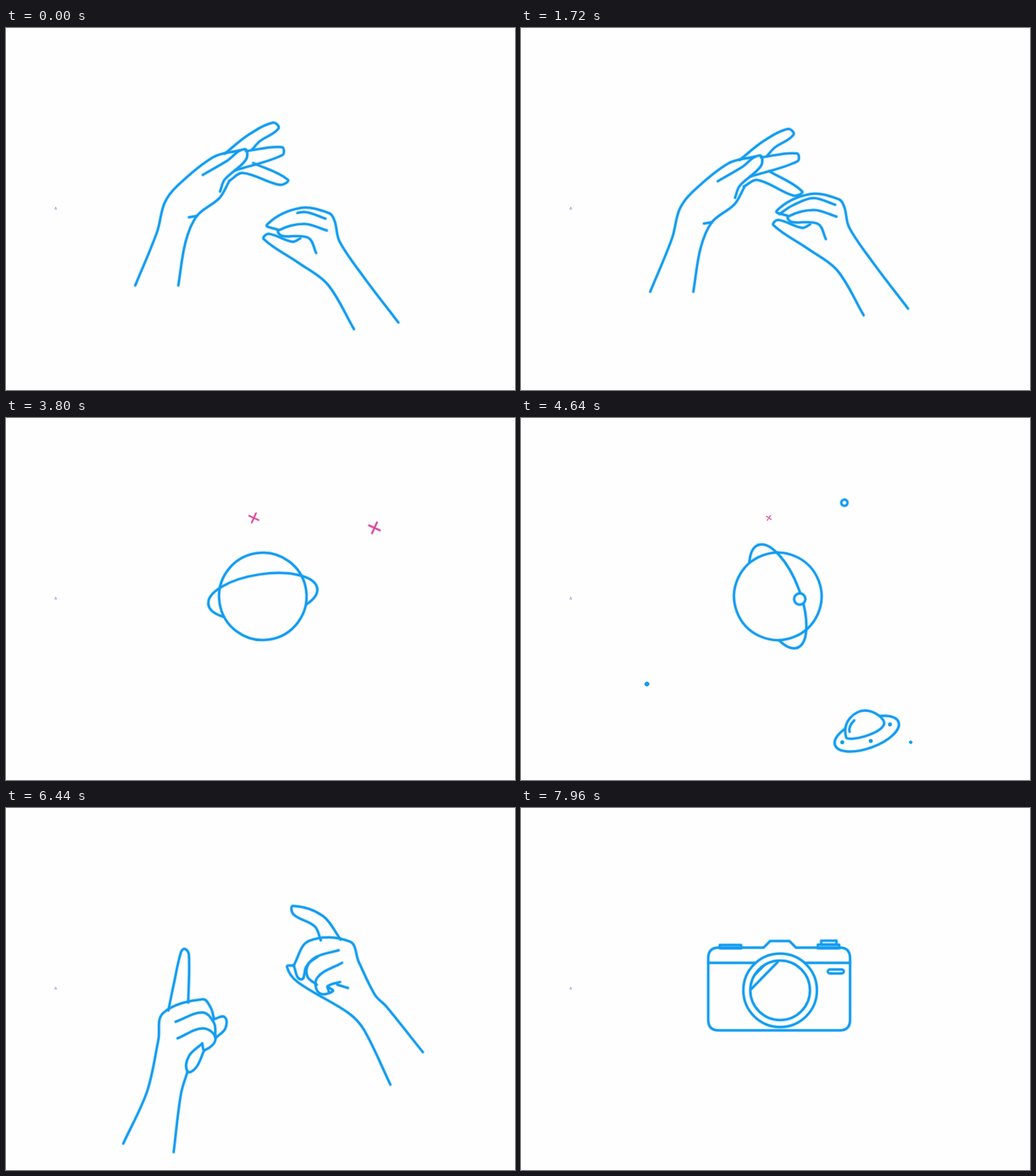
An HTML page with a canvas for the animation above (8000 ms loop, 768x547 px).

```html
<!DOCTYPE html>
<html>
<head>
<meta charset="utf-8">
<style>
html, body { margin: 0; width: 100%; height: 100%; overflow: hidden; background: #fefefe; }
canvas { display: block; }
</style>
</head>
<body>
<canvas width="768" height="547"></canvas>
<script>
const c = document.querySelector('canvas').getContext('2d');
const BLUE = '#129cf1', PINK = '#d84a9f', WHITE = '#fefefe';
const { PI, sin, cos, min, max, hypot } = Math, TAU = PI * 2;
c.lineCap = c.lineJoin = 'round';

const clamp = x => max(0, min(1, x));
const ease = x => (x = clamp(x), x * x * (3 - 2 * x));

function ink(path, color = BLUE, width = 3.5) {
  c.strokeStyle = color;
  c.globalAlpha = .16;
  c.lineWidth = width + 2.6;
  c.stroke(path);
  c.globalAlpha = 1;
  c.lineWidth = width;
  c.stroke(path);
}

function ellipse(x, y, rx, ry = rx, turn = 0, from = 0, to = TAU) {
  const path = new Path2D();
  path.ellipse(x, y, rx, ry, turn, from, to);
  return path;
}

function disc(x, y, r, color = BLUE) {
  c.fillStyle = color;
  c.fill(ellipse(x, y, r));
}

// Runs draw with the stage moved by x,y and turned and scaled about a pivot
function at(x, y, draw, scale = 1, turn = 0, px = 0, py = 0) {
  c.save();
  c.translate(x + px, y + py);
  c.rotate(turn);
  c.scale(scale, scale);
  c.translate(-px, -py);
  draw();
  c.restore();
}

// Smooth curve through key points; handles are a third of each segment
function curve(p) {
  const path = new Path2D(), last = p.length - 1;
  const dir = i => {
    const a = p[max(0, i - 1)], b = p[min(last, i + 1)];
    const d = hypot(b[0] - a[0], b[1] - a[1]);
    return [(b[0] - a[0]) / d, (b[1] - a[1]) / d];
  };
  path.moveTo(...p[0]);
  for (let i = 0; i < last; i++) {
    const a = p[i], b = p[i + 1], u = dir(i), v = dir(i + 1);
    const h = hypot(b[0] - a[0], b[1] - a[1]) / 3;
    path.bezierCurveTo(a[0] + u[0] * h, a[1] + u[1] * h, b[0] - v[0] * h, b[1] - v[1] * h, ...b);
  }
  return path;
}

const points = s => s.split(' ').map(p => p.split(',').map(Number));
const strokes = (...list) => list.map(s => curve(points(s)));
const drawAll = list => list.forEach(p => ink(p));

const openHand = strokes(
  '195,389 228,308 239,265 258,239 313,195 352,185',
  '297,222 333,201 360,183 362,199 330,229 323,247',
  '260,389 271,323 288,284 322,257 337,231',
  '276,286 288,284',
  '330,190 365,162 403,143 411,152 383,171 371,184',
  '362,186 416,180 417,192 346,215');
const [lowFinger] = strokes('337,231 357,219 413,237 425,229 373,204');

const pinchEdge = points('411,305 394,297 444,272 488,280 496,292 503,322 538,374 592,445');
const pinchThumb = points('444,318 432,323 396,311 389,319 440,354 485,387 525,455');
const pinchBody = new Path2D();
[...pinchEdge, ...[...pinchThumb].reverse()].forEach(p => pinchBody.lineTo(...p));
const pinchHand = [curve(pinchEdge), curve(pinchThumb),
  ...strokes('484,306 450,296 411,306 416,314 456,317 468,340')];
const [knuckle] = strokes('482,288 449,278 418,289 398,302');

const pointUp = strokes(
  '177,507 213,428 230,350 237,310 297,289 309,302 314,319',
  '245,306 253,267 264,218 270,213 276,222 275,294',
  '256,323 297,309 314,325 316,345',
  '259,348 297,333 316,348 300,366 296,356',
  '314,319 330,316 331,333 317,347',
  '296,356 276,375 274,398 287,392 299,366',
  '274,398 264,432 253,520');
const pointSide = strokes(
  '475,200 466,179 434,161 433,148 478,163 505,199',
  '434,238 457,201 519,202 532,232 557,283 573,299 629,369',
  '434,238 424,240 440,263 517,310 540,335 580,418',
  '434,238 445,259 453,240 468,225 502,215',
  '470,225 456,236 455,255 469,267',
  '507,234 470,256 472,279 493,277 485,270',
  '487,277 486,269 504,263',
  '500,267 516,272');

function pinchScene(t) {
  const bend = ease((t - 400) / 400);
  // The left hand swings down in a loop, rebounds and rests, every 1680 ms
  const u = max(0, t - 400) % 1680, swing = u / 880, rebound = clamp((u - 880) / 440);
  const x = swing < 1 ? -21 * sin(TAU * swing) : 0;
  const y = 9.5 * ease((t - 400) / 1320) + (swing < 1 ? 172 * sin(PI * swing) : -22 * sin(PI * rebound));
  at(x, y, () => {
    drawAll(openHand);
    at(0, 0, () => ink(lowFinger), 1, .1 * bend, 345, 222);
  });
  const lift = ease((t - 400) / 600);
  at(3 * lift - 11 * ease((t - 1200) / 500), -21 * lift, () => {
    c.fillStyle = WHITE;
    c.fill(pinchBody);
    drawAll(pinchHand);
    c.setLineDash([44 + 56 * bend, 200]);
    ink(knuckle);
  });
}

function ufo() {
  ink(ellipse(0, 0, 51, 22, -.35));
  const dome = new Path2D('M-31,6C-38,-18 -18,-35 -3,-35C12,-35 28,-22 26,-14C20,1 -25,12 -31,6Z');
  c.fillStyle = WHITE;
  c.fill(dome);
  ink(dome);
  ink(new Path2D('M-19,-20Q-28,-11 -26,-3'));
  [[-37, 13], [6, 11], [35, -14]].forEach(p => disc(...p, 3));
}

const cross = () => ink(new Path2D('M-9,0H9M0,-9V9'), PINK, 2.6);
const dot = () => disc(0, 0, 3.6);
const ring = () => ink(ellipse(0, 0, 4.7));

// Shape, place and the time at which each one is largest
const sparks = [
  [cross, 196, 289, 2960], [dot, 263, 193, 2960], [cross, 556, 166, 3560], [cross, 374, 151, 4150],
  [ring, 488, 128, 4600], [dot, 190, 402, 4600], [dot, 588, 490, 5050]
];

function planetScene(t) {
  for (const [shape, x, y, peak] of sparks) {
    const age = (t - peak) / 650;
    if (Math.abs(age) < 1)
      at(x, y, shape, min(1, 1.3 * cos(age * PI / 2)), .25 + (t - 2960) / 4800);
  }
  const run = (t - 2960) / 1680, turn = (4 + 155 * run) * PI / 180;
  const orbit = (-34 + 383 * run) * PI / 180, front = cos(orbit) > 0;
  const moon = () => {
    const x = -30 * cos(orbit), y = 83 * sin(orbit);
    disc(x, y, 9, WHITE);
    ink(ellipse(x, y, 8.5));
  };
  at(387.5, 269.5, () => {
    ink(ellipse(0, 0, 33.5, 83, 0, -PI / 2, PI / 2));
    if (!front) moon();
    disc(0, 0, 66, WHITE);
    ink(ellipse(0, 0, 66));
    ink(ellipse(0, 0, 33.5, 83, 0, PI / 2, PI * 1.5));
    if (front) moon();
  }, 1, turn);
  const fly = (t - 4000) / 1120;
  if (fly > 0 && fly < 1)
    at(440 + 295 * fly ** 2.3, 400 + 79 * sin(PI * fly), ufo, min(1, 3 * sin(PI * fly)));
}

function pointScene(t) {
  const s = sin((t - 6440) / 840 * TAU);
  at(-4 * s, -3 * s, () => drawAll(pointUp));
  at(-3 * s, -6 * s, () => drawAll(pointSide));
}

function box(x, y, w, h, r = 0) {
  const path = new Path2D();
  path.roundRect(x, y, w, h, r);
  ink(path);
}

function camera() {
  ink(new Path2D('M390,336H298Q282.5,336 282.5,320V227Q282.5,211 298,211H366L376,201H405L415,211H481Q496.5,211 496.5,227V320Q496.5,336 481,336Z'));
  ink(new Path2D('M283,234H496'));
  box(300, 207, 32, 5);
  box(448, 206.5, 32, 5.5);
  box(453, 200.5, 23, 6);
  box(463, 244, 24, 6, 3);
  disc(391, 275.5, 55.5, WHITE);
  ink(ellipse(391, 275.5, 55.5));
  c.fillStyle = BLUE;
  c.fill(ellipse(391, 275.5, 45, 45, 0, 3.55, 4.3));
  ink(ellipse(391, 275.5, 45));
  ink(new Path2D('M348,273L387,233'));
}

function frame(now) {
  const t = now % 8000;
  c.fillStyle = WHITE;
  c.fillRect(0, 0, 768, 547);
  c.strokeStyle = '#a9a0dc';
  c.lineWidth = 1;
  c.stroke(new Path2D('M73.5,273.5L75,270.5L76.5,273.5Z'));
  if (t < 2920) pinchScene(t);
  else if (t < 5160) planetScene(t);
  else if (t >= 5360 && t < 7600) pointScene(t);
  else if (t >= 7600) at(0, 0, camera, 1 - .1 * (1 - clamp((t - 7600) / 360)) ** 2, 0, 389.5, 268.5);
  requestAnimationFrame(frame);
}
requestAnimationFrame(frame);
</script>
</body>
</html>
```
